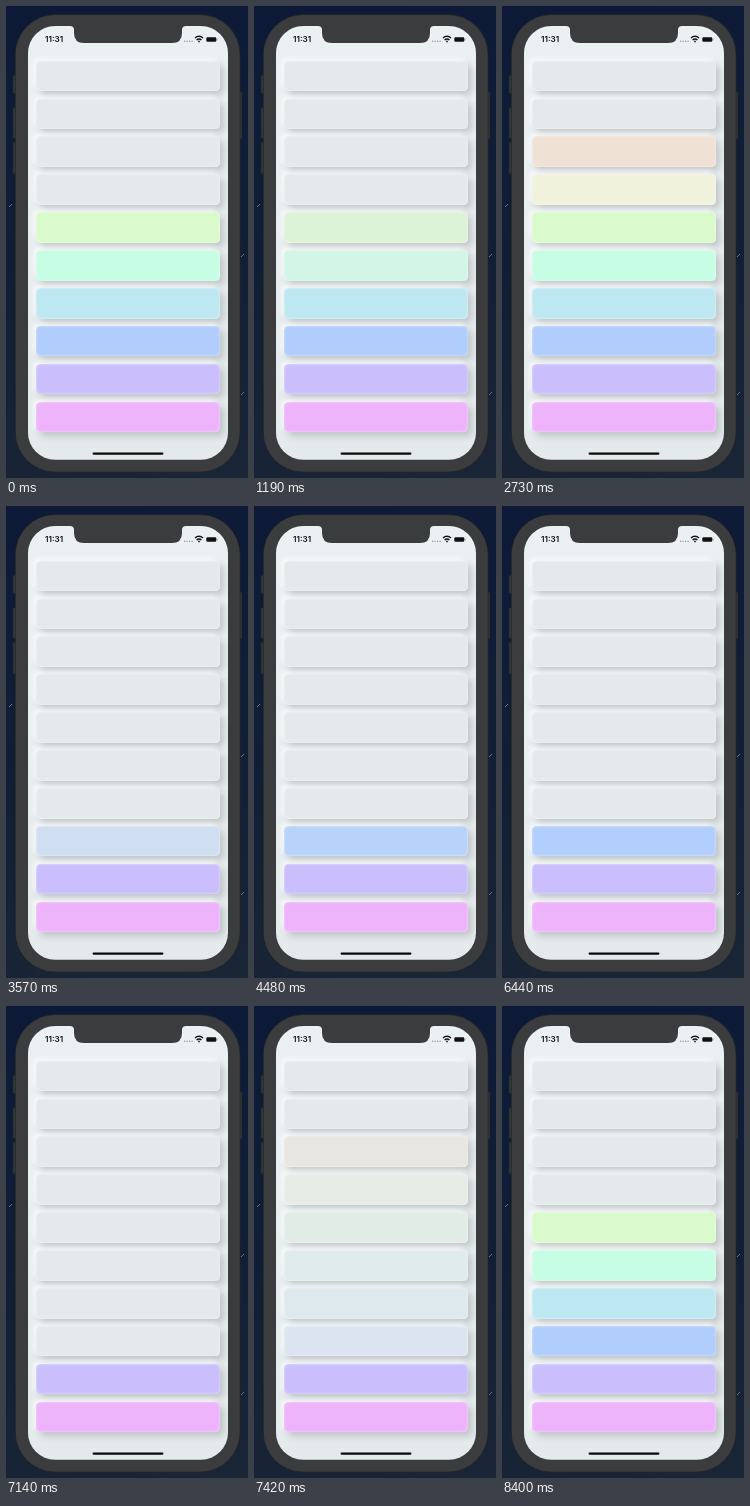
An HTML page for the animation above (8.47 s loop, 242 by 472 pixels).

```html
<!DOCTYPE html>
<html lang="en">
<head>
<meta charset="utf-8">
<title>Level meter</title>
<style>
html, body { margin: 0; width: 100%; height: 100%; overflow: hidden; }
body { position: relative; background: linear-gradient(170deg, #0c1a38, #101e35 50%, #1a2536); }
svg { position: absolute; left: 0; top: 0; }
.bar {
  position: absolute; left: 29.5px; width: 184.5px; height: 30.5px; border-radius: 4.5px;
  box-shadow: inset 0 0 2.5px rgba(255, 255, 255, .65),
    4px 4px 7px rgba(0, 0, 0, .17), -3px -3px 5px rgba(255, 255, 255, .65);
}
</style>
</head>
<body>
<svg width="242" height="472" viewBox="0 0 242 472">
  <defs>
    <linearGradient id="glass" x2="0" y2="1">
      <stop stop-color="#ebf0f2"/>
      <stop offset="1" stop-color="#e4eaec"/>
    </linearGradient>
  </defs>
  <path d="M3 201l3-3M235 251l3-3M235 389l3-3" stroke="#7c889a" stroke-width=".8"/>
  <g fill="#3a3c3d" stroke="#1c2025" stroke-width=".7">
    <rect x="7" y="69" width="5" height="18.5" rx="1"/>
    <rect x="7" y="101.5" width="5" height="31" rx="1"/>
    <rect x="7" y="136" width="5" height="32" rx="1"/>
    <rect x="231" y="86" width="5" height="47" rx="1"/>
    <rect x="9.2" y="8.5" width="225" height="457.7" rx="40"/>
  </g>
  <rect x="22" y="20" width="200" height="433.7" rx="27" fill="url(#glass)"/>
  <path d="M64 19.5V20q4 0 4 4v3q0 10 10 10h88q10 0 10-10v-3q0-4 4-4v-.5z" fill="#3a3c3d"/>
  <text x="39" y="36.3" font-family="Inter, Arial, sans-serif" font-size="8.2" font-weight="600" fill="#111">11:31</text>
  <path d="M178 35.4h9" stroke="#999" stroke-width="1.1" stroke-dasharray="1.2 1.3"/>
  <g fill="none" stroke="#111" stroke-width="1.5">
    <path d="M189 32q4-3.4 8 0M190.6 34q2.4-2 4.8 0"/>
    <path d="M192.2 35.4h1.6"/>
  </g>
  <rect x="200.3" y="31.2" width="10" height="4.6" rx="1.2" fill="#111"/>
  <path d="M211 32.7v1.6" stroke="#777" stroke-width=".8"/>
  <rect x="86.5" y="446.4" width="71" height="2.3" rx="1.15" fill="#080808"/>
</svg>
<script>
const LOOP = 8470, FADE = 400, START = 6, OFF = '#e4e9ec';

// lit colours from the lowest bar upward; the top two never light
const colors = ['#edb3fb', '#cabffc', '#b0cdfc', '#bee8f1', '#c6fde4', '#d9facb', '#fffdc7', '#fcd9b5', OFF, OFF];

// [time in ms, number of lit bars]
const levels = [
  [40, 8], [530, 6], [1020, 4], [1540, 8], [2515, 6], [2985, 2], [3400, 3],
  [4375, 2], [4725, 3], [5430, 8], [5800, 3], [6400, 2], [7320, 8], [8020, 6]
];

const bars = colors.map((_, i) => {
  const bar = document.createElement('div');
  bar.className = 'bar';
  bar.style.top = 395.7 - 37.9 * i + 'px';
  return bar;
});
document.body.append(...bars.slice().reverse());

function ease(x) {
  x = Math.min(1, Math.max(0, x));
  return x * x * (3 - 2 * x);
}

// each level change fades the bar from wherever it stands
function glow(i, t) {
  return levels.reduce(
    (v, [at, level]) => v + ((i < level) - v) * ease((t - at) / FADE),
    Number(i < START)
  );
}

function draw() {
  const t = performance.now() % LOOP;
  bars.forEach((bar, i) => {
    bar.style.background = `color-mix(in srgb, ${colors[i]} ${(100 * glow(i, t)).toFixed(2)}%, ${OFF})`;
  });
  requestAnimationFrame(draw);
}
draw();
</script>
</body>
</html>
```
